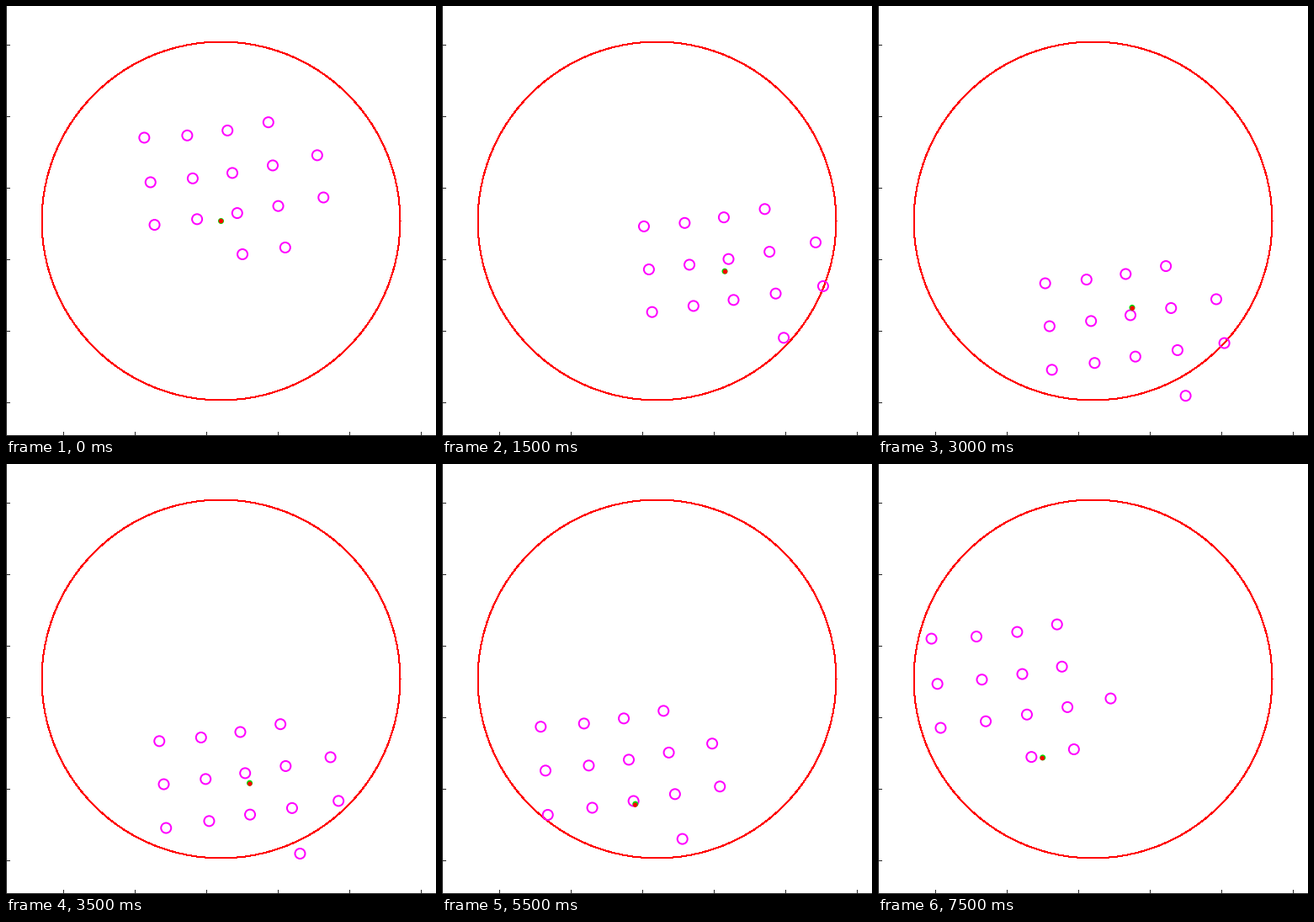
Write a matplotlib script that moves like this. It is 511x511 px and loops after 8 s.

```python
import numpy as np
import matplotlib.pyplot as plt
from matplotlib.animation import FuncAnimation
from matplotlib.patches import Circle

SIZE, DPI = 511, 73
PX = 72 / DPI
STEP_MS = 500
MID = SIZE / 2
BULGE = 0.014    # pincushion of the lattice at rest
WARP = 0.0031    # extra stretch as the lattice drifts
LAG, GAIN = 2, 0.83

# Drift of the lattice from rest, one waypoint per step
DRIFT = np.array([
    (0, 0), (51, 55.7), (67, 82), (71.5, 102.3),
    (56, 124), (41, 149), (31, 169), (15.2, 169),
    (-6, 179), (-31, 179), (-31, 169), (-47, 153),
    (-66.5, 138), (-72, 112.5), (-92, 92), (-97.5, 51.2),
])
FIRST_AIM = np.array([80.5, 59.7])   # where the tracker first locks on
LOCK = 3

# Four sheared rows with the corners cut off
COLUMNS = [range(0, 4), range(0, 5), range(0, 5), range(2, 4)]
CELLS = [(r, c) for r, cols in enumerate(COLUMNS) for c in cols]
V, U = (np.array(CELLS) - (1, 2)).T
R2 = U**2 + V**2
REST_X = 269 + (1 + BULGE * R2) * (46.9 * U + 5.7 * V) + 0.45 * U**2
REST_Y = 198.4 + (1 + BULGE * R2) * (48.4 * V - 7.6 * U) - 1.25 * U**2 - 1.4 * V**2


def lattice(dx, dy):
    along = 2 * WARP * (U * dx + V * dy)
    stretch = 1 + WARP * R2
    return REST_X + dx * stretch + U * along, REST_Y + dy * stretch + V * along


def tracker(n):
    return FIRST_AIM * n / LOCK if n <= LOCK else GAIN * DRIFT[n - LAG]


def detected(cell, dx, dy):
    """The outermost points drop out when the lattice drifts away from them."""
    if cell == (3, 2):
        return dy < 55
    return cell != (1, 4) or dx > -95


fig = plt.figure(figsize=(SIZE / DPI, SIZE / DPI), dpi=DPI, facecolor="white")
ax = fig.add_axes([0, 0, 1, 1])
ax.set_xlim(0, SIZE)
ax.set_ylim(SIZE, 0)
ax.axis("off")


def rule(xs, ys):
    ax.plot(xs, ys, color="#262626", lw=PX, solid_capstyle="butt", snap=False)


rule([0.5, 0.5], [0, SIZE])
rule([0, SIZE], [SIZE - 0.5] * 2)
for k in range(6):
    rule([68.5 + 85 * k] * 2, [SIZE - 5, SIZE])
    rule([0, 5], [46.5 + 85 * k] * 2)

t = np.linspace(0, 2 * np.pi, 101)
ax.plot(MID + 213 * np.cos(t), MID + 213 * np.sin(t), color="red", lw=PX,
        antialiased=False)

rings = [ax.add_patch(Circle((0, 0), 6, fill=False, ec="magenta", lw=2 * PX, zorder=3))
         for _ in CELLS]
green = ax.add_patch(Circle((0, 0), 3.5, fc="#00e000", ec="none", zorder=4))
red = ax.add_patch(Circle((0, 0), 2.7, fc="red", ec="none", zorder=5))


def draw(n):
    dx, dy = DRIFT[n]
    for ring, cell, x, y in zip(rings, CELLS, *lattice(dx, dy)):
        ring.center = (x, y)
        ring.set_visible(detected(cell, dx, dy))
    aim = tracker(n)
    green.center = MID + aim
    red.center = MID + 1.007 * aim
    return [*rings, green, red]


anim = FuncAnimation(fig, draw, frames=len(DRIFT), init_func=lambda: draw(0),
                     interval=STEP_MS, repeat=True, repeat_delay=0, blit=False)
plt.show()
```
